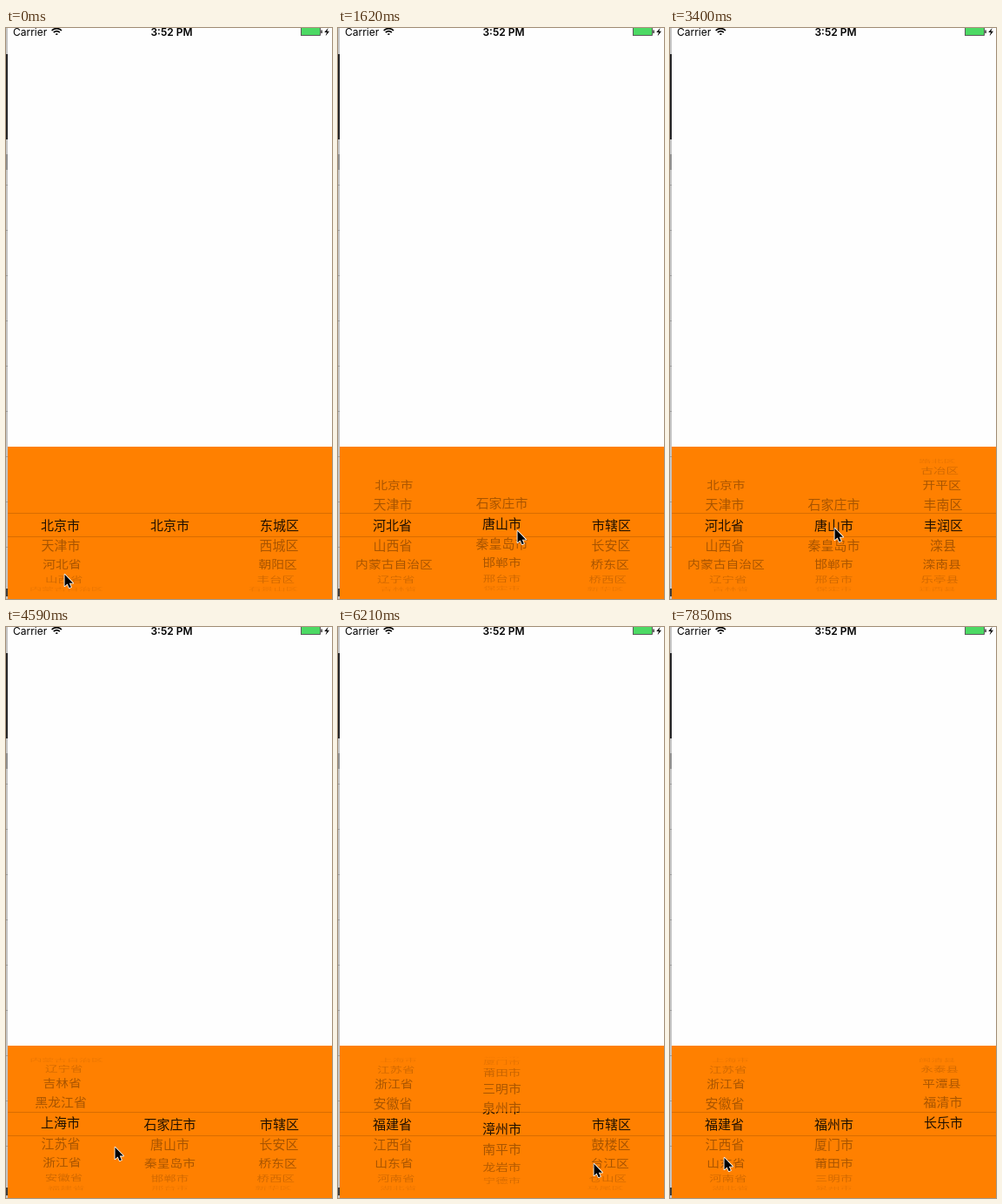
An HTML page with a canvas for the animation above (8000 ms loop, 375 by 656 pixels).

```html
<!DOCTYPE html>
<html lang="zh">
<head>
<meta charset="utf-8">
<title>地区选择</title>
<style>
  html, body { margin: 0; width: 100%; height: 100%; overflow: hidden; background: #fff; }
  canvas { display: block; width: 375px; height: 656px; }
</style>
</head>
<body>
<canvas id="stage"></canvas>
<script>
const W = 375, H = 656, LOOP = 8000, STEP = 148, FIRST = 287;
const MID = 571, RADIUS = 77, PITCH = Math.PI / 10;
const BAND_TOP = 557, BAND_BOTTOM = 584, SHEET_TOP = 481;
const AXIS = 188.5, COLUMN_GAP = 126;
const CJK = '15px "Noto Sans CJK SC", "Noto Sans CJK", sans-serif';

// Moments when a stopped wheel refills the ones to its right
const HEBEI = 1180, TANGSHAN = 1900, RESET = 3980, FUJIAN = 6050;

const list = s => s.split(' ');
const provinces = list('北京市 天津市 河北省 山西省 内蒙古自治区 辽宁省 吉林省 黑龙江省 上海市 江苏省 浙江省 安徽省 福建省 江西省 山东省 河南省 湖北省 湖南省');
const cities = {
  beijing: list('北京市'),
  hebei: list('石家庄市 唐山市 秦皇岛市 邯郸市 邢台市 保定市 张家口市 承德市 沧州市 廊坊市 衡水市'),
  fujian: list('福州市 厦门市 莆田市 三明市 泉州市 漳州市 南平市 龙岩市 宁德市')
};
const districts = {
  beijing: list('东城区 西城区 朝阳区 丰台区 石景山区 海淀区'),
  shijiazhuang: list('市辖区 长安区 桥东区 桥西区 新华区 井陉矿区 裕华区 井陉县 正定县 栾城县 行唐县'),
  tangshan: list('市辖区 路南区 路北区 古冶区 开平区 丰南区 丰润区 滦县 滦南县 乐亭县 迁西县 玉田县'),
  fuzhou: list('市辖区 鼓楼区 台江区 仓山区 马尾区 晋安区 闽侯县 连江县 罗源县 闽清县 永泰县 平潭县 福清市 长乐市')
};

const clamp = u => Math.min(1, Math.max(0, u));
const smooth = u => u * u * (3 - 2 * u);

// A flick coasts to rest; a snap turns at even speed
const move = (power, start, end, rows) => t =>
  rows * (1 - (1 - clamp((t - start) / (end - start))) ** power);
const flick = (...args) => move(2.5, ...args);
const snap = (...args) => move(1, ...args);
const wheel = (...moves) => t => moves.reduce((row, m) => row + m(t), 0);

const wheels = [
  wheel(flick(320, HEBEI, 2), flick(3858, 6177, 10)),
  wheel(snap(1330, 1610, 1.08), snap(1620, 1850, -0.08), snap(RESET, 4280, -1),
        flick(5124, 5970, 7), snap(FUJIAN, 6540, -7)),
  wheel(flick(2150, 3250, 6), snap(RESET, 4400, -6), flick(6350, 7800, 13.08))
];

// Pointer stops: time, x, y
const stops = [[300, 67, 627], [800, 74, 574], [1619, 206, 577], [2060, 305, 618], [2900, 314, 570],
  [3395, 189, 574], [3950, 76, 608], [4200, 70, 572], [4583, 125, 597], [5030, 88, 570],
  [5615, 202, 571], [6207, 294, 616], [7100, 308, 570], [7835, 62, 609]];

const canvas = document.getElementById('stage');
const g = canvas.getContext('2d');
const dpr = window.devicePixelRatio || 1;
canvas.width = W * dpr;
canvas.height = H * dpr;

function pointerAt(t) {
  const next = Math.max(1, stops.findIndex(s => s[0] >= t));
  const [t0, x0, y0] = stops[next - 1], [t1, x1, y1] = stops[next];
  const u = smooth(clamp((t - t0) / (t1 - t0)));
  return [x0 + (x1 - x0) * u, y0 + (y1 - y0) * u];
}

function citiesAt(t) {
  return t < HEBEI ? cities.beijing : t < FUJIAN ? cities.hebei : cities.fujian;
}

function districtsAt(t) {
  if (t < HEBEI) return districts.beijing;
  if (t >= FUJIAN) return districts.fuzhou;
  return t >= TANGSHAN && t < RESET ? districts.tangshan : districts.shijiazhuang;
}

function rect(color, x, y, w, h) {
  g.fillStyle = color;
  g.fillRect(x, y, w, h);
}

function polygon(points) {
  g.beginPath();
  for (let i = 0; i < points.length; i += 2) g.lineTo(points[i], points[i + 1]);
  g.closePath();
}

function drawWindowEdge() {
  rect('#c4c4c4', 0, 0, 2, H);
  rect('#252527', 0, 30, 2, 98);
  rect('#929292', 0, 145, 2, 18);
  for (let y = 180; y < 630; y += 52) rect('#9c9c9c', 0, y, 2, 1);
  rect('#3c3c3c', 0, 644, 2, 9);
}

function drawStatusBar() {
  g.fillStyle = '#000';
  g.textAlign = 'left';
  g.font = '12px Inter, sans-serif';
  g.fillText('Carrier', 8, 8.7);
  g.textAlign = 'center';
  g.font = '600 12px Inter, sans-serif';
  g.fillText('3:52 PM', 190.5, 8.7);

  g.strokeStyle = '#000';
  g.lineWidth = 1.6;
  for (const r of [1.5, 5, 8]) {
    g.beginPath();
    g.arc(58.3, 8.6, r, -Math.PI * 0.75, -Math.PI * 0.25);
    g.stroke();
  }

  rect('#4cd964', 340, 0, 21, 8);
  g.lineWidth = 0.8;
  g.strokeStyle = '#333';
  g.strokeRect(339.5, -0.5, 22, 9);
  rect('#333', 362.3, 2.5, 1.5, 3.5);
  g.fillStyle = '#000';
  polygon([370.6, 0, 366.2, 5, 369, 5, 367.6, 9.2, 372, 3.8, 369.3, 3.8]);
  g.fill();
}

function drawWheel(items, row, offset, inBand) {
  items.forEach((name, i) => {
    const angle = (i - row) * PITCH;
    if (Math.abs(angle) > 1.5) return;
    const depth = Math.cos(angle);
    const dy = RADIUS * Math.sin(angle);
    const near = 1 - 0.08 * (1 - depth);
    const fade = clamp((82 - Math.abs(dy)) / 36);
    g.save();
    g.translate(AXIS + offset * near, MID + dy);
    g.scale(near, depth);
    g.fillStyle = `rgba(0,0,0,${inBand ? 0.88 : 0.34 * fade})`;
    g.fillText(name, 0, 5.6);
    g.restore();
  });
}

function drawPicker(t) {
  rect('#ff8000', 2, SHEET_TOP, W - 2, H - SHEET_TOP);
  g.textAlign = 'center';
  g.font = CJK;
  const columns = [provinces, citiesAt(t), districtsAt(t)];
  const edges = [SHEET_TOP, BAND_TOP, BAND_BOTTOM, H];
  for (let z = 0; z < 3; z++) {
    g.save();
    g.beginPath();
    g.rect(2, edges[z], W - 2, edges[z + 1] - edges[z]);
    g.clip();
    columns.forEach((items, c) => drawWheel(items, wheels[c](t), (c - 1) * COLUMN_GAP, z === 1));
    g.restore();
  }
  for (const y of [BAND_TOP, BAND_BOTTOM]) rect('rgba(0,0,0,.15)', 2, y, W - 2, 1);
}

function drawPointer(x, y) {
  g.save();
  g.translate(x + 0.5, y + 0.8);
  g.scale(0.84, 0.84);
  polygon([0, 0, 0, 16, 3.7, 12.6, 6.2, 18.3, 8.8, 17.2, 6.3, 11.7, 11.3, 11.7]);
  g.lineJoin = 'round';
  g.lineWidth = 2;
  g.strokeStyle = '#fff';
  g.stroke();
  g.fillStyle = '#000';
  g.fill();
  g.restore();
}

function draw(now) {
  const time = now % LOOP;
  const t = time < FIRST ? 0 : FIRST + Math.floor((time - FIRST) / STEP) * STEP;
  g.setTransform(dpr, 0, 0, dpr, 0, 0);
  rect('#fefefe', 0, 0, W, H);
  drawWindowEdge();
  drawStatusBar();
  drawPicker(t);
  drawPointer(...pointerAt(t));
}

const start = performance.now();
function tick() {
  draw(performance.now() - start);
  requestAnimationFrame(tick);
}
tick();
</script>
</body>
</html>
```
